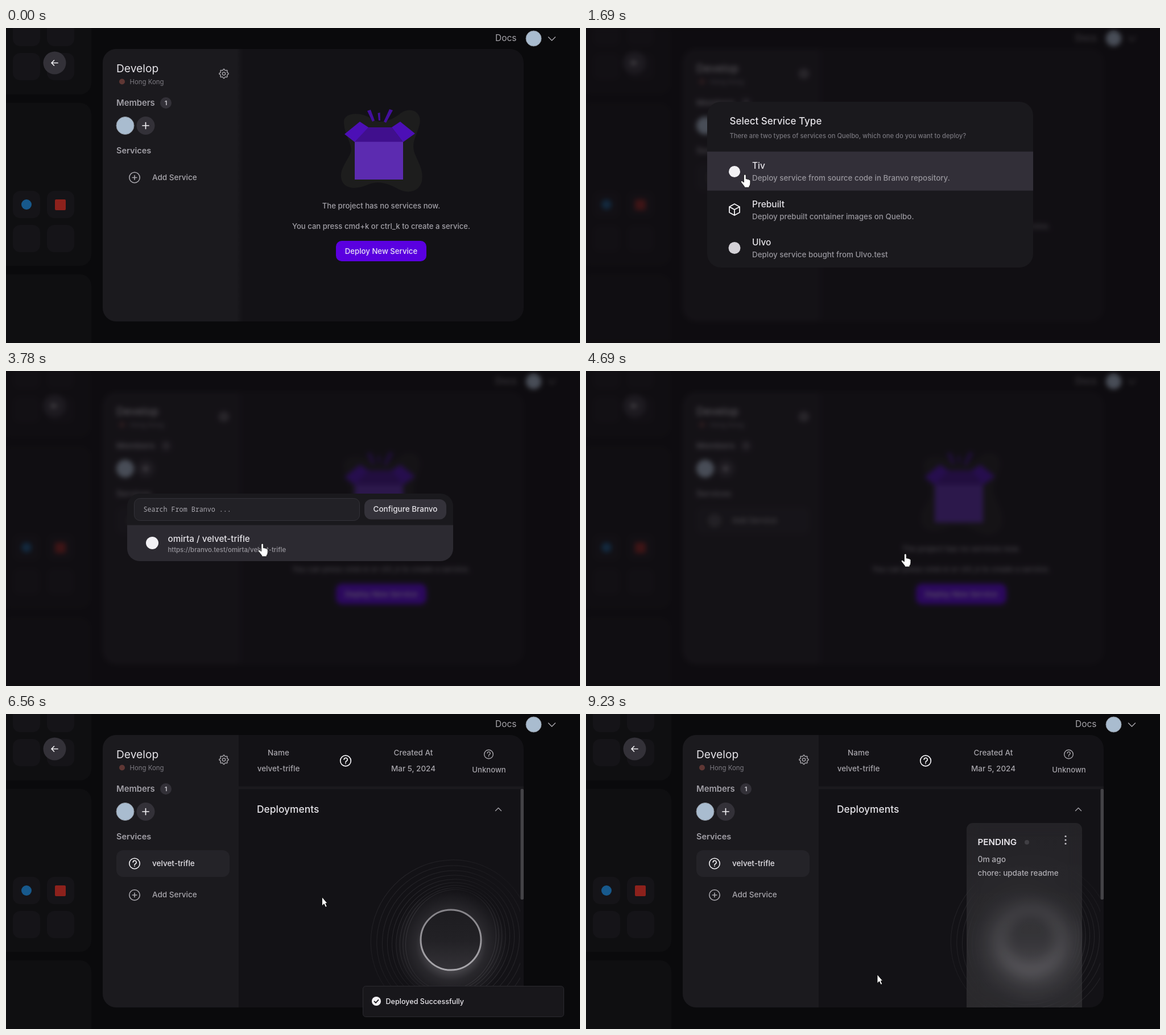
These frames come from a looping animation (1009x555 px, 9280 ms). An HTML page:

```html
<!DOCTYPE html>
<html lang="en">
<head>
<meta charset="utf-8">
<title>Deploy a service</title>
<style>
  html, body { margin: 0; width: 100%; height: 100%; overflow: hidden; background: #0a0a0c; }
  #stage { position: relative; width: 1009px; height: 555px; overflow: hidden; }
  #stage > svg, #veil { position: absolute; left: 0; top: 0; width: 1009px; height: 555px; }
  text { font-family: Inter, "Open Sans", sans-serif; white-space: pre; }
  .mono { font-family: "Noto Sans Mono", "DejaVu Sans Mono", monospace; }
  #veil { background: rgba(18, 15, 20, .64); backdrop-filter: blur(4px); }
  #main { position: absolute; left: 409px; top: 37px; width: 501px; height: 480px; overflow: hidden; }
  #card { position: absolute; left: 260px; top: 155px; width: 203px; height: 345px; border-radius: 11px;
    background: linear-gradient(rgba(255,255,255,.075), rgba(255,255,255,.1)); backdrop-filter: blur(13px); }
  #card svg { position: absolute; left: 0; top: 0; }
</style>
</head>
<body>
<div id="stage"></div>
<script>
const LOOP = 9280;
const SITE = "Quelbo", HOST = "Branvo", REPO = "velvet-trifle", OWNER = "omirta";

// ---- drawing helpers ----
const text = (x, y, s, size, fill, weight = 400, more = "") =>
  `<text x="${x}" y="${y}" font-size="${size}" fill="${fill}" font-weight="${weight}" ${more}>${s}</text>`;
const mid = (x, y, s, size, fill, weight = 400) => text(x, y, s, size, fill, weight, 'text-anchor="middle"');
const rect = (x, y, w, h, r, fill, more = "") =>
  `<rect x="${x}" y="${y}" width="${w}" height="${h}" rx="${r}" fill="${fill}" ${more}/>`;
const dot = (x, y, r, fill, more = "") => `<circle cx="${x}" cy="${y}" r="${r}" fill="${fill}" ${more}/>`;
const line = (d, color, w = 1.6, more = "") =>
  `<path d="${d}" fill="none" stroke="${color}" stroke-width="${w}" stroke-linecap="round" stroke-linejoin="round" ${more}/>`;
const shape = (d, fill) => `<path d="${d}" fill="${fill}"/>`;
const group = (id, body) => `<g id="${id}">${body}</g>`;
const layer = body => `<svg viewBox="0 0 1009 555">${body}</svg>`;

const avatar = (x, y, r) => dot(x, y, r - .5, "#a9bccf", 'stroke="#8b929c"');
const plus = (x, y, r, color, w) => line(`M${x - r} ${y}h${2 * r}M${x} ${y - r}v${2 * r}`, color, w);
const help = (x, y, r, color, w) => dot(x, y, r, "none", `stroke="${color}" stroke-width="${w}"`) +
  line(`M${x - r * .3} ${y - r * .25}a${r * .32} ${r * .32} 0 1 1 ${r * .45} ${r * .3}q${-r * .15} ${r * .1} ${-r * .15} ${r * .25}M${x} ${y + r * .52}v.1`, color, w);

function gear(x, y) {
  let d = "";
  for (let i = 0; i < 32; i++) {
    const a = (i - .5) * Math.PI / 16, r = i % 4 < 2 ? 8 : 6.3;
    d += `${i ? "L" : "M"}${(x + r * Math.cos(a)).toFixed(1)} ${(y + r * Math.sin(a)).toFixed(1)}`;
  }
  return line(d + "Z", "#a9a7ad", 1.4) + dot(x, y, 2.6, "none", 'stroke="#a9a7ad" stroke-width="1.4"');
}

// ---- page ----
const tiles = y => [12, 72].map(x => rect(x, y, 48, 48, 13, "#151418")).join("");
const backdrop =
  rect(0, 0, 1009, 555, 0, "#0a0a0c") +
  rect(-60, -60, 210, 177, 20, "#0f0f11") + rect(-60, 132, 210, 287, 20, "#0f0f11") + rect(-60, 434, 210, 200, 20, "#0f0f11") +
  [-16, 44, 287, 347].map(tiles).join("") +
  dot(36, 311, 9, "#17598c") + rect(86, 302, 19, 19, 2, "#8d211c") +
  dot(85.5, 61.5, 20, "#333138") + line("M91 61.5H80M84.5 57l-4.5 4.5 4.5 4.5", "#f2f1f4", 1.7) +
  text(860, 23, "Docs", 15.5, "#a6a4aa") + avatar(927.5, 18.5, 14) +
  line("M953.5 16l6 6 6-6", "#a6a4aa", 1.5);

const sidebar =
  shape("M409 37H194a24 24 0 0 0-24 24V493a24 24 0 0 0 24 24H409Z", "#1b1a1e") +
  text(194, 77.5, "Develop", 19.2, "#e6e4e9") +
  dot(204, 94.5, 5, "#5f3734") + text(217.5, 98.5, "Hong Kong", 11.4, "#7c7a81") + gear(383, 80.5) +
  text(194, 137, "Members", 14.8, "#a19fa6", 600) + dot(281, 132, 10, "#333138") + mid(281, 136, "1", 11, "#d0ced4", 600) +
  avatar(209.5, 172, 16) + dot(245.5, 172, 16, "#333138") + plus(245.5, 172, 5.5, "#f2f1f4", 1.7) +
  text(194, 220.5, "Services", 14.5, "#a19fa6", 600) +
  rect(194, 240, 199, 47, 12, "#202024", 'id="hover"') +
  group("service", rect(194, 240, 199, 47, 12, "#242328") + help(226, 263.5, 9.2, "#f2f1f4", 1.6) +
    text(257, 267.5, REPO, 13.5, "#e4e2e7", 500)) +
  group("add", dot(226, 263.5, 9.2, "none", 'stroke="#a9a7ad" stroke-width="1.6"') + plus(226, 263.5, 3.8, "#a9a7ad", 1.6) +
    text(257, 267.5, "Add Service", 13.5, "#a9a7ad", 500));

const empty =
  rect(405, 37, 12, 480, 0, "url(#edge)") +
  shape("M594 165C594 150 622 146 642 160C660 172 682 160 694 150C712 138 732 148 727 170C722 190 712 200 718 220C726 240 734 250 731 270C726 290 705 292 690 284C672 274 655 268 636 276C615 285 596 284 590 268C585 252 597 238 605 222C612 206 594 190 594 165Z", "#1d1d1d") +
  shape("M636 175H678L698 201H613Z", "#400f8d") +
  shape("M595 187L622 165 637 175 613 201Z", "#4c0fb6") + shape("M678 175L693 165 719 186 698 201Z", "#4c0fb6") +
  rect(613, 200.5, 85, 66.5, 0, "#5c2bb0") +
  shape("M635 146L641 144 648 163 644 165Z", "#430f9c") + shape("M653.5 150L657.5 149 658 163 655 163Z", "#430f9c") +
  shape("M674 143L680 145 668 167 664 165Z", "#430f9c") +
  mid(659.5, 317.5, "The project has no services now.", 13.2, "#a19fa6", 500) +
  mid(659.5, 353.5, "You can press cmd+k or ctrl_k to create a service.", 13.1, "#a19fa6", 500) +
  rect(580, 375, 159, 36, 10, "#5a00e0") + mid(659.5, 397.5, "Deploy New Service", 13.2, "#e9e4f5", 500);

// tilted ellipses, denser near the bright ring
function rings() {
  let out = "";
  for (let i = 0; i < 9; i++) {
    const r = 78 + i * 4 + i * i * .45;
    out += `<ellipse cx="782" cy="398" rx="${r}" ry="${r + 12 - i}" transform="rotate(${20 + i * 3} 782 398)" ` +
      `fill="none" stroke="url(#arc)" stroke-opacity="${(.13 - i * .005).toFixed(3)}"/>`;
  }
  return out;
}
const detail =
  mid(479, 72.5, "Name", 13.5, "#a6a4aa", 500) + mid(479, 100.5, REPO, 13.5, "#a6a4aa", 500) +
  help(597, 82.5, 9.3, "#f2f1f4", 1.7) +
  mid(716, 72.5, "Created At", 13.5, "#a6a4aa", 500) + mid(716, 100.5, "Mar 5, 2024", 13.5, "#a6a4aa", 500) +
  help(848.5, 71, 7.8, "#a6a4aa", 1.4) + mid(849, 102.5, "Unknown", 13.2, "#a6a4aa", 500) +
  rect(409, 127.5, 501, 5, 0, "#1b1a1e") +
  text(441, 174, "Deployments", 17.4, "#e6e4e9", 500) + line("M860.5 170.5l5-5 5 5", "#a6a4aa", 1.4) +
  `<g clip-path="url(#view)">${rings()}${dot(782, 408, 100, "url(#glow)")}</g>` +
  dot(782, 398, 53, "url(#disc)", 'stroke="url(#rim)" stroke-width="3"') +
  rect(904.5, 132, 5.5, 195, 2, "#444347");

const defs = `<defs>
  <linearGradient id="edge"><stop stop-color="#1b1a1e"/><stop offset="1" stop-color="#131216"/></linearGradient>
  <linearGradient id="rim" x2="0" y2="1"><stop stop-color="#858388"/><stop offset="1" stop-color="#aaa8ad"/></linearGradient>
  <linearGradient id="arc"><stop stop-color="#d8d6dc"/><stop offset=".5" stop-color="#d8d6dc" stop-opacity=".3"/><stop offset="1" stop-color="#d8d6dc"/></linearGradient>
  <linearGradient id="disc" x2="0" y2="1"><stop stop-color="#1d1c20"/><stop offset=".5" stop-color="#222125"/><stop offset="1" stop-color="#343237"/></linearGradient>
  <radialGradient id="glow"><stop offset=".4" stop-color="#8a888e" stop-opacity=".5"/>
    <stop offset=".62" stop-color="#77757b" stop-opacity=".22"/><stop offset="1" stop-color="#77757b" stop-opacity="0"/></radialGradient>
  <clipPath id="view"><rect x="409" y="133" width="495" height="384"/></clipPath>
</defs>`;

// ---- dialogs, toast, card, pointer ----
const option = (y, name, info, icon) => icon +
  text(292, y, name, 15.5, "#e6e4e9", 500) + text(292, y + 21, info, 13.4, "#98969d", 500);
const picker =
  rect(213, 130, 573, 292, 24, "#1a191d") + rect(213, 217.5, 573, 1, 0, "#26252a") +
  rect(213, 218, 573, 68.5, 0, "#322f38", 'id="active"') +
  text(252.5, 170, "Select Service Type", 17, "#e6e4e9", 500) +
  text(252.5, 194, `There are two types of services on ${SITE}, which one do you want to deploy?`, 11.2, "#77757c", 500) +
  option(248, "Tiv", `Deploy service from source code in ${HOST} repository.`, dot(261, 253, 10, "#f2f1f4")) +
  option(315.5, "Prebuilt", `Deploy prebuilt container images on ${SITE}.`,
    line("M261 310l9 5v10l-9 5-9-5v-10zM252 315l9 5 9-5M261 320v10", "#f2f1f4", 1.8)) +
  option(383, "Ulvo", "Deploy service bought from Ulvo.test", dot(261, 387.5, 10.5, "#d4d2d7"));

const search =
  rect(213, 216, 573, 119, 22, "#1a191d") +
  `<path id="pick" d="M213 271.5H786V313a22 22 0 0 1-22 22H235a22 22 0 0 1-22-22Z" fill="#2c2a31"/>` +
  rect(225.5, 224.5, 396, 39, 10, "#222126", 'stroke="#333238"') +
  text(241.5, 247.5, `Search From ${HOST} ...`, 11.7, "#a9a7ae", 400, 'class="mono"') +
  rect(242, 236, 1, 17, 0, "#f2f1f4", 'id="caret"') +
  rect(630, 226, 144, 35.5, 12, "#34323a") + mid(702, 248, `Configure ${HOST}`, 13.5, "#e6e4e9", 500) +
  dot(257, 303, 11, "#f2f1f4", 'id="logo"') +
  text(284.5, 301, `${OWNER} / ${REPO}`, 15.2, "#e6e4e9", 500) +
  text(284.5, 319, `https://branvo.test/${OWNER}/${REPO}`, 11.4, "#98969d", 500);

const toast =
  rect(627.5, 479.5, 353, 54, 5, "#18171b", 'stroke="#2b2a2f"') +
  dot(651, 506, 8, "#f2f1f4") + line("M647.5 506.3l2.5 2.5 4.5-5", "#18171b", 1.8) +
  text(667.5, 510.5, "Deployed Successfully", 12.6, "#e9e7ec", 500);

const card = `<svg width="203" height="345">` +
  text(19.5, 39, "PENDING", 15.2, "#e9e7ec", 600) + dot(106, 34, 4, "#403f44") +
  [23.5, 30, 36.5].map(y => dot(174, y, 1.6, "#c4c2c8")).join("") +
  text(19.5, 69, "0m ago", 13.8, "#b0aeb4", 500) + text(19.5, 93, "chore: update readme", 13.5, "#b0aeb4", 500) + `</svg>`;

const pointer =
  dot(0, 0, 12, "#bdb400", 'id="tap" opacity=".78"') +
  group("arrow", `<path d="M.5 .5V16l3.6-3.4 2.5 5.7 2.6-1.1-2.5-5.6H10Z" fill="#fff" stroke="#000" stroke-width=".8"/>`) +
  group("hand", `<path d="M-.6 2a1.9 1.9 0 0 1 3.8 0V8q1.8-.9 2.8.6 1.7-.7 2.6.7 2.3-.3 2.3 2V16q0 3-2 5v2H.4V21.3L-5.3 14q-1-1.7.6-2.4 1.5-.4 2.7 1L-.6 14Z" fill="#fff" stroke="#000" stroke-width=".8"/>`) +
  group("beam", line("M-3-8h2.2l.8.8.8-.8H3M0-7V7M-3 8h2.2l.8-.8.8.8H3", "#e8e8e8", 1.2));

const $ = id => document.getElementById(id);
$("stage").innerHTML =
  layer(defs + backdrop + rect(170, 37, 740, 480, 24, "#131216") + sidebar + group("empty", empty) + group("detail", detail)) +
  `<div id="main"><div id="card">${card}</div></div><div id="veil"></div>` +
  layer(group("toast", toast) + group("picker", picker) + group("search", search) + group("pointer", pointer));

// ---- motion ----
// progress from 0 to 1 in 50 ms steps, the first one landing at a and the last at b
const steps = (t, a, b) => t < a ? 0 : Math.min(1, (Math.floor((t - a) / 50) + 1) / ((b - a) / 50 + 1));
const within = (t, a, b) => t >= a && t < b;
const smooth = p => p * p * (3 - 2 * p);
const easeOut = p => 1 - (1 - p) ** 2.25;
const mix = (a, b, p) => a + (b - a) * p;

// start, end, x, y, optional bend point
const moves = [
  [130, 980, 278, 258],
  [1890, 2490, 360, 252],
  [3480, 4080, 560, 322, 415, 313],
  [6560, 6560, 555, 322],
  [6770, 6820, 551, 324],
  [7020, 7070, 549, 325],
  [7220, 7370, 543, 334],
  [7420, 7570, 557, 344],
  [7620, 7670, 553.5, 345.5],
  [8020, 8420, 502, 482],
  [8830, 9230, 511.5, 458.5]
];
const taps = [[1080, 1290], [2550, 2750], [4440, 4640]];

function pointerAt(t) {
  let x = 583, y = 514;
  for (const [a, b, tx, ty, bx = (x + tx) / 2, by = (y + ty) / 2] of moves) {
    if (t < a) break;
    const p = smooth(steps(t, a, b)), q = 1 - p;
    x = q * q * x + 2 * q * p * bx + p * p * tx;
    y = q * q * y + 2 * q * p * by + p * p * ty;
  }
  return [x, y];
}

const fade = (id, v) => { $(id).style.opacity = v; };
const show = (id, on) => { $(id).style.display = on ? "" : "none"; };
const move = (id, v) => $(id).setAttribute("transform", v);

function draw(t) {
  const [x, y] = pointerAt(t);
  const after = t >= 4840;

  show("empty", !after);
  show("detail", after);
  show("hover", within(t, 1290, 4840));
  const grow = smooth(steps(t, 5090, 5440));
  fade("service", grow);
  move("add", `translate(0 ${after ? mix(-6, 55.5, grow) : 0})`);

  const open = steps(t, 1290, 1690);
  const veil = open * (1 - steps(t, 4840, 4990));
  show("veil", veil > 0);
  fade("veil", veil);

  show("picker", within(t, 1290, 2750));
  fade("picker", open);
  const s = mix(.95, 1, open);
  move("picker", `translate(499.5 276) scale(${s}) translate(-499.5 -276)`);
  fade("active", steps(t, 1490, 1690));

  show("search", within(t, 2750, 4690));
  fade("search", 1 - steps(t, 4590, 4690));
  show("logo", t >= 2900);
  show("caret", within(t, 3120, 3620));
  show("pick", y >= 271);

  const rise = easeOut(steps(t, 4840, 5240)), drop = smooth(steps(t, 8830, 9230));
  show("toast", after && drop < 1);
  fade("toast", rise * (1 - drop));
  move("toast", `translate(0 ${54 * (1 - rise) + 20 * drop})`);

  const pending = smooth(steps(t, 8020, 8420));
  show("card", pending > 0);
  fade("card", pending);

  const onAdd = t < 1290 && x > 194 && x < 393 && y > 240 && y < 287;
  const beam = within(t, 2750, 4840) && y < 264;
  const hand = onAdd || within(t, 1290, 2750) || (within(t, 2750, 4840) && y >= 271);
  show("pointer", t >= 130);
  move("pointer", `translate(${x.toFixed(1)} ${y.toFixed(1)})`);
  show("beam", beam);
  show("hand", hand);
  show("arrow", !beam && !hand);
  show("tap", taps.some(([a, b]) => within(t, a, b)));
}

const start = performance.now();
function frame() {
  draw((performance.now() - start) % LOOP);
  requestAnimationFrame(frame);
}
frame();
</script>
</body>
</html>
```
